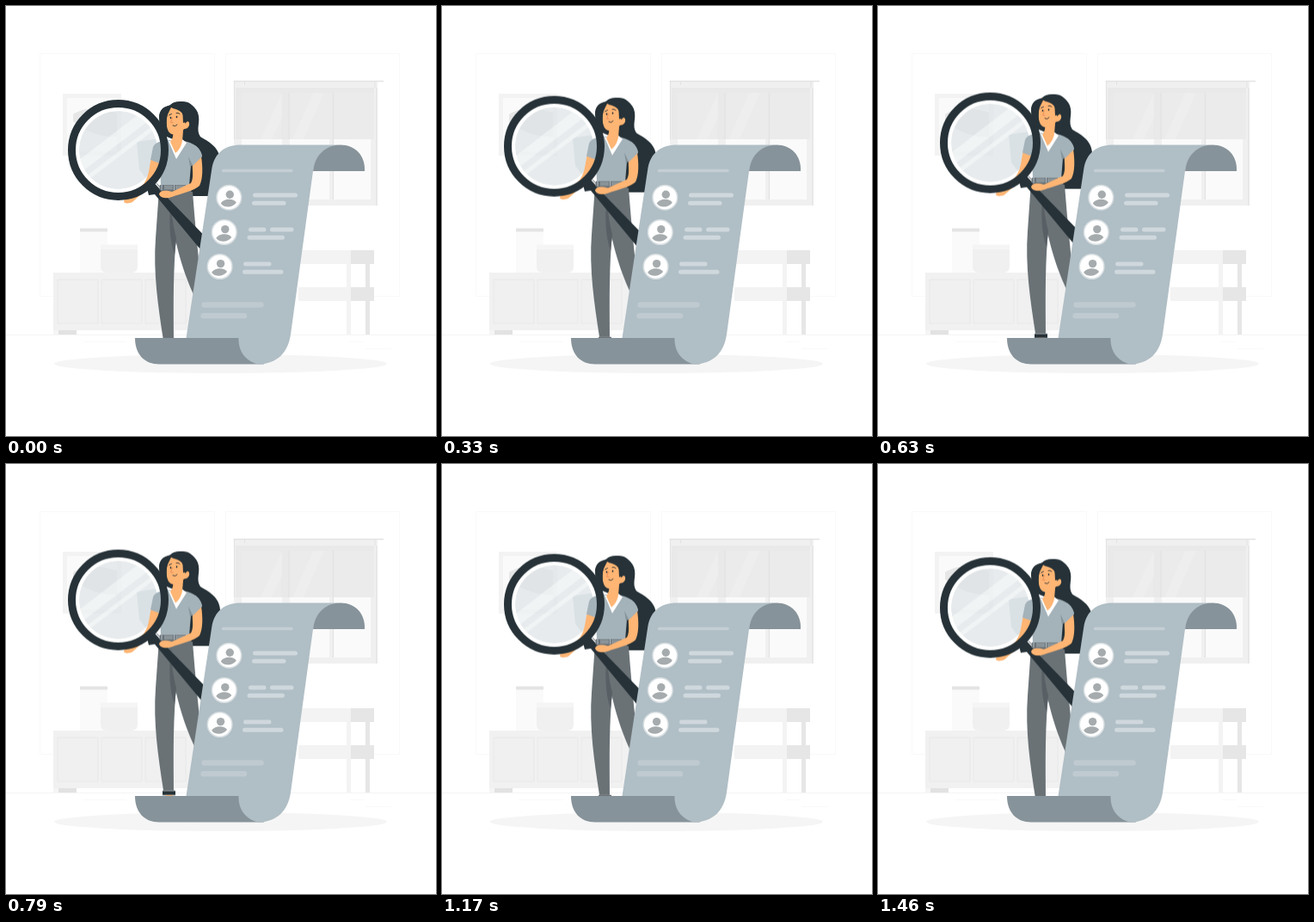
Animation of 500x500 px, one loop 1.5 s. Source, as an HTML page without scripts:

```html
<!DOCTYPE html>
<html lang="en">
<head>
<meta charset="utf-8">
<title>Searching a list</title>
<style>
  html, body { margin: 0; width: 100%; height: 100%; overflow: hidden; background: #fff; }
  svg { display: block; width: 100%; height: 100%; }
  .float { animation: float 1500ms linear infinite; }
  @keyframes float { 50% { transform: translateY(-10px); } }
  .line { fill: none; stroke-linecap: round; }
  .skin { fill: #ffb573; }
  .dark { fill: #263238; }
  .shirt { fill: #a4b2b9; }
</style>
</head>
<body>
<svg viewBox="0 0 500 500">
  <defs>
    <clipPath id="lens"><circle cx="130.5" cy="167.5" r="45.5"/></clipPath>
    <g id="person">
      <circle r="14.3" fill="#fff" stroke="#d8dfe2" stroke-width="1.5"/>
      <circle cx="1" cy="-3.4" r="4.7" fill="#a6acae"/>
      <path d="M-9.5 7C-7 1 6 .5 8.500 6C4 12-5 12.500-9.500 7Z" fill="#a6acae"/>
    </g>
  </defs>

  <!-- room -->
  <g fill="none" stroke="#f9f9f9">
    <path d="M39.500 55.500H242.500V337.500H39.500ZM255.500 55.500H457.500V337.500H255.500Z"/>
    <path d="M0 382.500H500" stroke="#f5f5f5"/>
    <path d="M400 390.500H416M418 398.500H448M90 390.500H140"/>
  </g>

  <!-- window -->
  <path d="M265 88H432V232H265Z" fill="#f0f0f0"/>
  <path d="M274 101H321V225H274ZM330 101H376V225H330ZM381 101H424V225H381Z" fill="#fafafa"/>
  <path d="M267 95H428V155H267Z" fill="#e9e9e9"/>
  <path d="M274 101H320V155H274ZM330 101H379V155H330ZM382 101H428V155H382Z" fill="#ebebeb"/>
  <path d="M296 155L321 101V130L309 155ZM333 155L357 101H370L346 155Z" fill="#eee"/>
  <g fill="none" stroke="#e3e3e3">
    <path d="M264.500 87.500H439" stroke-width="1.500"/>
    <path d="M265.500 88V155M329 101V155M380.500 101V225M431 95V232" stroke-width="1.200"/>
    <path d="M277.500 88V92M429 88V95"/>
  </g>

  <!-- picture -->
  <path d="M68.500 104.500H131.500V171.500H68.500Z" fill="#fafafa" stroke="#f3f3f3" stroke-width="5"/>
  <path d="M78 126C92 117 110 118 129 124V152C110 153 92 146 78 134Z" fill="#e6e6e6"/>

  <!-- cabinet and jars -->
  <path d="M86 262H118V310H86Z" fill="#fafafa"/>
  <path d="M86 258.500H118V262.500H86Z" fill="#e4e4e4"/>
  <path d="M110 283H153V303Q153 310 146 310H117Q110 310 110 303Z" fill="#f0f0f0"/>
  <path d="M110 277.500H153V283H110Z" fill="#f5f5f5"/>
  <path d="M55 310H230V377H55Z" fill="#f1f1f1"/>
  <path d="M60 318H107V369H60ZM111 318H158V369H111ZM162 318H209V369H162Z" fill="#f0f0f0" stroke="#e8e8e8"/>
  <path d="M55 377H61V382H55Z" fill="#f5f5f5"/>
  <path d="M61 377H82V382H61Z" fill="#e2e2e2"/>

  <!-- shelf -->
  <path d="M340 284H401V300H340ZM340 327H401V343H340ZM396 284H401V382H396Z" fill="#f3f3f3"/>
  <path d="M401 284H428V300H401ZM401 327H428V343H401ZM418 300H423V382H418Z" fill="#e6e6e6"/>

  <ellipse cx="249.500" cy="416" rx="193.500" ry="11" fill="#f5f5f5"/>

  <g class="float">
    <!-- hair behind -->
    <path class="dark" d="M191 115C196 109 217 109 223 124C227 135 220 143 226 152C234 157 248 163 249 179C249 199 246 214 236 221H215L206 160L187 152C177 143 175 123 184 118Z"/>

    <!-- glass -->
    <circle cx="130.500" cy="167.500" r="47.500" fill="none" stroke="#fff" stroke-width="5"/>
    <g clip-path="url(#lens)">
      <circle cx="130.500" cy="167.500" r="45.500" fill="#fff" opacity=".45"/>
      <circle cx="130.500" cy="167.500" r="45.500" fill="#cfd8dc" opacity=".5"/>
      <path d="M171 155L152 158L155 190L166 205H180V155Z" fill="#b7c9d2" opacity=".3"/>
      <g stroke="#fff" opacity=".42">
        <path d="M80 191L166 125" stroke-width="13"/>
        <path d="M88 205L180 135" stroke-width="5"/>
      </g>
    </g>

    <!-- legs -->
    <path d="M192 216H217C220 255 224 300 230 343H222C212 325 201 293 196 266Z" fill="#6a7276"/>
    <path d="M178 213H216C209 238 199 262 197 280C194 320 195 360 195 389H183C177 350 171 310 174 270Z" fill="#6a7276"/>
    <path d="M192 220C189 250 190 272 196 289L198 270C194 255 192 240 192 220Z" fill="#596065"/>
    <path class="dark" d="M182 389.500H197V394.500H182Z"/>
    <path class="skin" d="M186 394.500H194V402H186Z"/>

    <!-- far arm -->
    <path class="skin" d="M170 174L179 179C178 191 176 202 166 211L147 228C140 231 135 229 138 225L160 207C168 195 166 184 170 174Z"/>

    <!-- shirt -->
    <path class="shirt" d="M191 156C182 157 174 157 171 164L168 179L179 183L180 209H213L215 185L228 175C227 166 219 159 207 157Z"/>
    <path d="M214 187L212 175L217 185Z" fill="#84939b"/>
    <path d="M189 157L198 178L210 159L205 155Z" fill="#fff"/>
    <path class="skin" d="M194 145H206L205 157C204 163 201 168 197 171L191 158C194 154 195 150 194 145Z"/>
    <path d="M179 208H215V214H178Z" fill="#687279"/>
    <path d="M184 208.500H194V213.500H184ZM197 208.500H208V213.500H197Z" fill="#899398"/>
    <path d="M181 208V214M195.500 208V214M209.500 208V214" stroke="#b8c1c6"/>

    <!-- head -->
    <path class="skin" d="M192 117C186 125 185 139 189 146C193 152 203 150 207 143C212 143 215 138 212 134C208 133 208 136 206 136L205 117Z"/>
    <path class="dark" d="M191 117C195 121 203 119 206 127C208 132 207 138 209 136C212 132 216 136 213 141L221 146C227 130 221 111 205 111C197 111 192 113 191 117Z"/>
    <path class="dark" d="M193 116C184 115 178 121 178 129C179 139 181 147 187 152C188 147 185 135 188 126Z"/>
    <g class="line" stroke="#263238" stroke-width=".9">
      <path d="M189.500 127L192.500 125.500M198 124.500Q200 123.500 202 125.500M194 139Q197 141 199 138"/>
      <path d="M193.500 130L191.500 135.500L194 135.500" stroke="#e98c57"/>
    </g>
    <ellipse class="dark" cx="191.500" cy="130" rx=".8" ry="1.200"/>
    <ellipse class="dark" cx="198.500" cy="129" rx=".8" ry="1.200"/>

    <!-- magnifier -->
    <path class="dark" d="M164 212L174 205L179 210L178 213L233 269.500V291L226 283L173 219L166 220Z"/>
    <path d="M173.500 206L178.500 211.500" stroke="#fff" stroke-width="1.200"/>
    <circle cx="130.500" cy="167.500" r="54" fill="none" stroke="#263238" stroke-width="9"/>

    <!-- near arm -->
    <path class="skin" d="M217 180L227 175C229 188 229 201 225 209C219 215 203 218 193 222C187 224 180 224 178 219C179 214 186 214 193 216L215 206C219 199 216 190 217 180Z"/>
    <path class="shirt" d="M212 171L217 186L228 175C227 169 224 165 220 162Z"/>
  </g>

  <!-- scroll -->
  <path d="M150 386H274L300 416.500H178C161 416.500 150 405 150 386Z" fill="#87939a"/>
  <path d="M209.500 386L239.500 188C243 171 254 161.500 273 161.500H390C372 162 360 174 357 192L331 382C328 403 315 416.500 293 416.500C279 413 270 402 270.500 386Z" fill="#b0bec5"/>
  <path d="M357 192C359 173 372 161.500 389 161.500C406 161.500 418 174 417 192Z" fill="#87939a"/>

  <g class="line" stroke="#cfd8dd" stroke-width="5">
    <path d="M289.500 220H336.500M288.500 229.300H323M284.500 260H300M309.500 260H332M283 269.200H321.500M278.500 300H306M277.500 309.200H320"/>
    <path d="M252.500 191.500H332" stroke="#c4ced4" stroke-width="3.500"/>
    <path d="M230.500 347.500H296.500M229.500 360.200H277" stroke="#bfcad0" stroke-width="6.500"/>
  </g>
  <use href="#person" x="259.300" y="222.700"/>
  <use href="#person" x="253.800" y="263"/>
  <use href="#person" x="248.600" y="303"/>
</svg>
</body>
</html>
```
